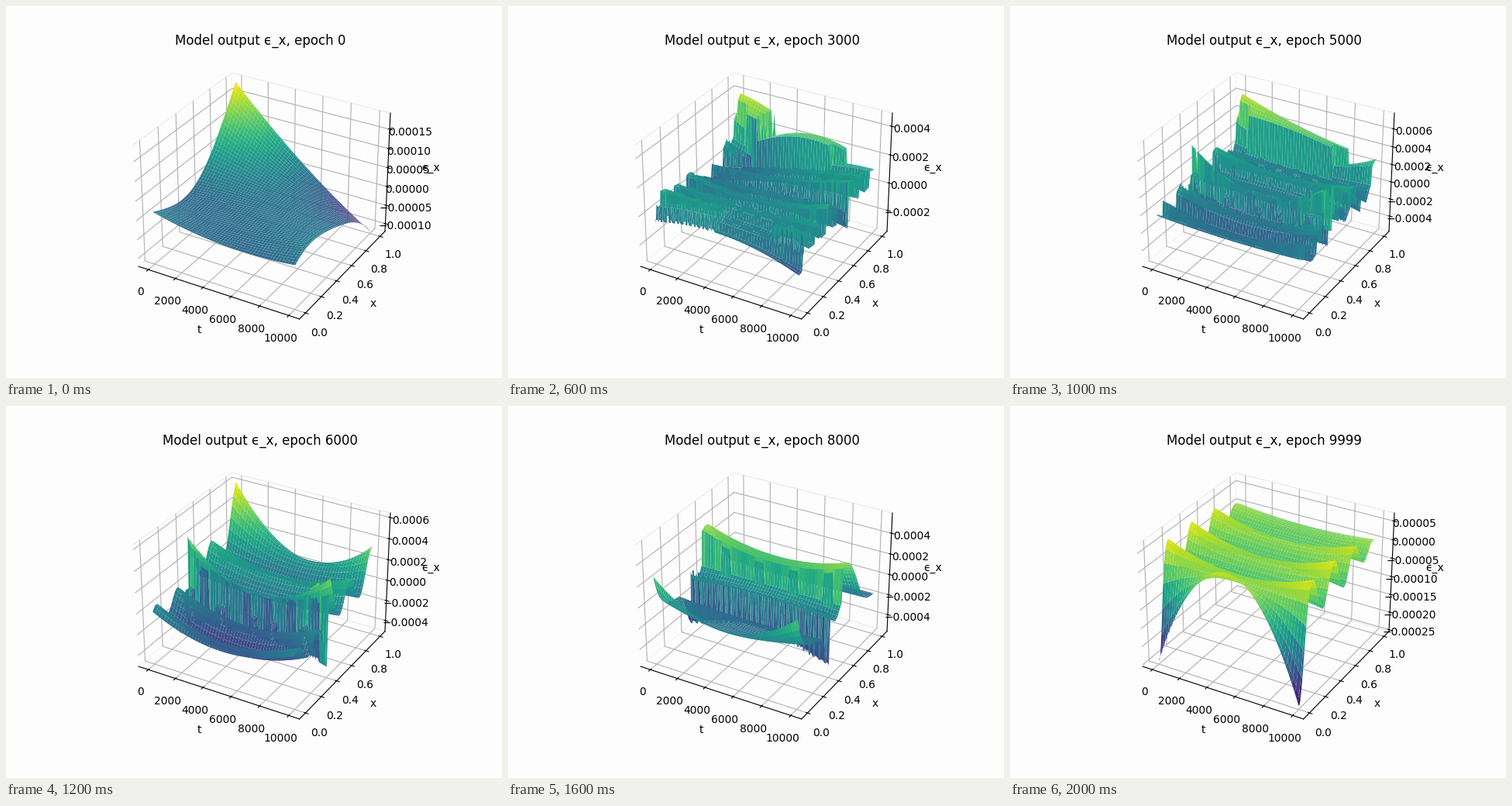
Animation, 640 px wide and 480 px high, one loop 2.1 s. Source, as a matplotlib script:

```python
import numpy as np
import matplotlib.pyplot as plt
from matplotlib.animation import FuncAnimation

PAPER = "#fdfdfd"
plt.rcParams.update({
    "figure.facecolor": PAPER,
    "axes.facecolor": PAPER,
    "font.family": "DejaVu Sans",
})

N = 100
U, V = np.meshgrid(np.linspace(0, 1, N), np.linspace(0, 1, N))
P = 2 * U - 1    # runs from -1 to 1 along t
Q = P ** 2
PI = np.pi


def bump(center, width):
    return np.exp(-((V - center) / width) ** 2)


def decay(start, length):
    return np.exp(-np.maximum(V - start, 0) / length)


def ripple(crest, period):
    return np.cos(2 * PI * (V - crest) / period)


def behind(pos, freq, amp=0.008):
    """Mask of everything past a ragged edge in x."""
    return V > pos + amp * np.sin(freq * U)


def mix(a, b, w):
    return a + (b - a) * w


# Each shape gives heights from 0 (lowest) to 1 (highest).

def smooth_peak():
    tilt = -.04 + .55 * V - 1.01 * V ** 2
    return .34 + .1 * V + tilt * P + (.02 + .04 * ripple(0, 1)) * Q


def broken_peak():
    h = (.36 + .14 * np.sin(PI * V / .7) - .1 * V
         - .08 * P * np.cos(PI * V / .45) - .1 * Q * (decay(0, .1) + bump(.66, .1)))
    fade = np.clip(1 - V / .35, 0, 1)
    corners = ((U < .42) & behind(.02, 210)) | ((U > .78) & behind(.08, 190))
    h = np.where(corners, mix(h, .68, fade), h)
    w = (V - .66) / .34
    plate = .48 - .05 * w + (.18 + .17 * w) * P + (.1 - .3 * w) * Q
    h = np.where(behind(.66, 230), plate, h)
    return np.where(behind(.8 + .74 * U, 200), 1 - 1.3 * U - 2.6 * (1 - V), h)


def ridges():
    high = .5 + (.03 + .17 * bump(.4, .09)) * Q
    low = .38 - .12 * Q + .14 * decay(0, .02) - .1 * bump(.8, .08) * U ** 3
    x = V + .006 * np.sin(47 * U)
    h = np.where((x - .07) % .145 < .07, high, low)
    arch = (V > .924) & (abs(U - .41) < .31) | (V > .965) & (abs(U - .41) < .39)
    return np.where(arch, 1 - 1.25 * (U - .38) ** 2, h)


def stepped_valley():
    front = (.24 + .16 * Q + .08 * ripple(.04, .24) - .25 * Q * bump(.41, .05))
    block = (V > .34) & (np.sin(31 * U) + np.sin(53 * U) > .9)
    front = np.where(block, .33 + .1 * Q, front)
    rise = np.clip((V - .85) / .15, 0, 1) ** 2
    back = (.45 + .08 * Q + (.06 + .06 * Q) * ripple(.42, .27)
            + .22 * Q * decay(.41, .05) + (.28 * Q - .12 * P) * rise)
    return np.where(behind(.405, 40), back, front)


def tall_wall():
    front = (.22 + .09 * Q + (.08 + .12 * Q) * decay(0, .06)
             - (.12 + .3 * Q) * bump(.41, .06))
    drop = 1 / (1 + np.exp((V - .8) / .04))
    back = (.28 + (.34 + .11 * Q) * drop
            + (.1 + .13 * Q) * decay(.41, .05))
    return np.where(behind(.405, 170), back, front)


def curled_wall():
    front = (.5 + (.13 + .34 * Q) * decay(0, .06)
             - (.2 + .25 * Q) * bump(.46, .1))
    back = .4 + (.42 + .12 * Q) * bump(.61, .15)
    return np.where(behind(.55, 26), back, front)


def waves():
    swell = (.06 + .1 * Q) * (1 - V ** 4) * ripple(.42, .27)
    return .77 + .04 * Q + swell + (.23 - .88 * Q) * bump(0, .07)


# epoch, shape, lowest and highest value
KEYS = [
    (0, smooth_peak, -1.148e-4, 1.85e-4),
    (2000, broken_peak, -5.1e-5, 7.1e-5),
    (4000, ridges, -6.22e-4, 8.78e-4),
    (6000, stepped_valley, -4.85e-4, 6.19e-4),
    (7000, tall_wall, -7.53e-4, 8.05e-4),
    (9000, curled_wall, -3.38e-4, 3.31e-4),
    (9999, waves, -2.48e-4, 6.5e-5),
]
EPOCHS, MAKERS, LOWS, HIGHS = zip(*KEYS)
SHAPES = [np.clip(make(), 0, 1) for make in MAKERS]


def output(epoch):
    """Surface values and their range at one epoch."""
    i = min(np.searchsorted(EPOCHS, epoch, side="right"), len(KEYS) - 1) - 1
    w = (epoch - EPOCHS[i]) / (EPOCHS[i + 1] - EPOCHS[i])
    low = mix(LOWS[i], LOWS[i + 1], w)
    high = mix(HIGHS[i], HIGHS[i + 1], w)
    return mix(low, high, mix(SHAPES[i], SHAPES[i + 1], w)), low, high


fig = plt.figure(figsize=(6.4, 4.8), dpi=100)
ax = fig.add_subplot(projection="3d")


def draw(step):
    epoch = min(500 * step, 9999)
    z, low, high = output(epoch)
    ax.clear()
    for axis in (ax.xaxis, ax.yaxis, ax.zaxis):
        axis.set_pane_color((.992, .992, .992, 1))
        axis.pane.set_edgecolor("#eeeeee")
    ax.plot_surface(10000 * U, V, z, cmap="viridis", vmin=low, vmax=high)
    ax.auto_scale_xyz([0, 10000], [0, 1], [low, high], had_data=False)
    ax.set_xlabel("t")
    ax.set_ylabel("x")
    ax.set_zlabel("\u03f5_x")
    ax.set_title(f"Model output \u03f5_x, epoch {epoch}")
    return []


anim = FuncAnimation(fig, draw, frames=21, interval=100, repeat=True,
                     repeat_delay=0, blit=False)
plt.show()
```
